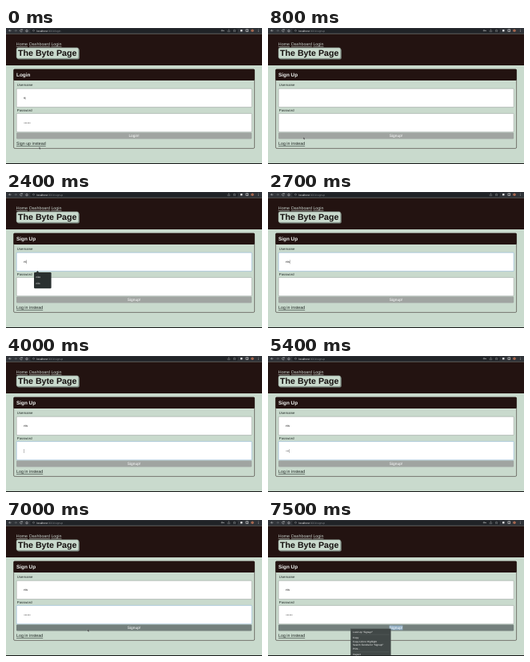
Animation of 320 by 171 pixels, one loop 8 s. Source, as an HTML page:

```html
<!DOCTYPE html>
<html lang="en">
<head>
<meta charset="utf-8">
<title>Sign up demo</title>
<style>
  html, body { margin: 0; width: 100%; height: 100%; overflow: hidden; background: #c9dacd; }
  svg { display: block; width: 100vw; height: 100vh; }
  text { font-family: "Liberation Sans", Arial, sans-serif; text-rendering: geometricPrecision; white-space: pre; }
  .link { font-size: 5.33px; text-decoration: underline; }
  .label { font-size: 4.27px; fill: #222b27; }
  .bold { font-weight: bold; }
  .menu { font-size: 3.1px; fill: #fff; }
</style>
</head>
<body>
<svg id="stage" viewBox="0 0 320 171" preserveAspectRatio="none"></svg>
<script>
const LOOP = 8000, TICK = 100;
const INK = '#231311', PAGE = '#c9dacd', GREY = '#8f9692', BLUE = '#7eaad6';
const stage = document.getElementById('stage');

function add(tag, attrs, parent = stage, content) {
  const el = document.createElementNS('http://www.w3.org/2000/svg', tag);
  for (const k in attrs) el.setAttribute(k, attrs[k]);
  if (content !== undefined) el.textContent = content;
  parent.appendChild(el);
  return el;
}
const rect = (x, y, width, height, fill, more = {}, parent) =>
  add('rect', { x, y, width, height, fill, ...more }, parent);
const text = (x, y, content, more = {}, parent) => add('text', { x, y, ...more }, parent, content);
const line = (d, stroke, width = 0.6, parent) =>
  add('path', { d, stroke, 'stroke-width': width, fill: 'none' }, parent);
const group = () => add('g', {});
const show = (el, on) => el.setAttribute('visibility', on ? 'visible' : 'hidden');
const write = (el, s) => { if (el.textContent !== s) el.textContent = s; };

// Browser bar
rect(0, 0, 320, 171, PAGE);
rect(0, 0, 320, 7.5, '#303338');
rect(30, 0.8, 260, 5.2, '#202327', { rx: 2.6 });
line('M6.5 3.3H3.7M5 1.9L3.7 3.3L5 4.7', '#d5d7d8', 0.5);
line('M10.5 3.3H13.3M12 1.9L13.3 3.3L12 4.7', '#777b7f', 0.5);
const reload = line('M20.2 2.4A1.5 1.5 0 1 0 20.4 4M20.4 1.4V2.7H19.1', '#d5d7d8', 0.5);
const stop = line('M17.7 2L20.3 4.6M20.3 2L17.7 4.6', '#d5d7d8', 0.5);
line('M24.6 3.3L26 1.9L27.4 3.3M25 3V4.7H27V3', '#d5d7d8', 0.5);
add('circle', { cx: 34.5, cy: 3.3, r: 1, fill: 'none', stroke: '#a5a9ac', 'stroke-width': 0.45 });
const url = add('text', { x: 38.4, y: 4.5, 'font-size': 3.4 });
add('tspan', { fill: '#f2f3f4' }, url, 'localhost');
const path = add('tspan', { fill: '#85898d' }, url);
const key = group();
add('circle', { cx: 270, cy: 3.3, r: 0.8, fill: 'none', stroke: '#c8cbcd', 'stroke-width': 0.5 }, key);
line('M270.9 3.3H272.8M272.4 3.3V4.2', '#c8cbcd', 0.5, key);
line('M277.2 3V4.7H279.8V3M278.5 3.8V1.7M277.8 2.4L278.5 1.7L279.2 2.4', '#a3a7aa', 0.4);
line('M285.6 1.8L286.1 2.8L287.2 2.9L286.3 3.7L286.6 4.8L285.6 4.2L284.6 4.8L284.9 3.7L284 2.9L285.1 2.8Z', '#a3a7aa', 0.4);
rect(293, 2.1, 2.5, 2.5, '#d8dadc', { rx: 0.5 });
rect(300, 1.9, 2.7, 2.7, 'none', { stroke: '#e4e6e7', 'stroke-width': 0.6 });
add('circle', { cx: 308, cy: 3.3, r: 1.8, fill: '#a5674f' });
for (const y of [1.9, 3.3, 4.7]) add('circle', { cx: 315.5, cy: y, r: 0.35, fill: '#d5d7d8' });

// Site header
rect(0, 7.5, 320, 39.5, INK);
[[12.8, 'Home'], [29, 'Dashboard'], [56.4, 'Login']].forEach(([x, s]) =>
  text(x, 22.4, s, { class: 'link', fill: '#c9d3cd' }));
rect(14, 26, 77.8, 13.6, '#7d8981', { rx: 2 });
rect(13, 24.8, 77.8, 13.6, PAGE, { rx: 2, stroke: '#69746d', 'stroke-width': 0.5 });
text(15, 34.9, 'The Byte Page', { class: 'bold', 'font-size': 10.67, fill: '#15100f' });

// Form card
rect(9.6, 52, 301, 99.4, PAGE, { rx: 1.4, stroke: INK, 'stroke-width': 0.5 });
rect(9.4, 51.7, 301.4, 14.3, INK, { rx: 1.2 });
const heading = text(13, 61.2, '', { class: 'bold', 'font-size': 6.4, fill: '#f1f4f2' });
text(13.8, 73.3, 'Username', { class: 'label' });
text(13.8, 104.6, 'Password', { class: 'label' });
const fields = [76.2, 107.4].map(y =>
  rect(13.2, y, 294, 23.4, '#fff', { rx: 0.8, 'stroke-width': 0.5 }));
const user = text(22.2, 89.2, '', { 'font-size': 4, fill: '#111' });
const dots = Array.from({ length: 6 }, (_, i) =>
  add('circle', { cx: 23 + i * 1.4, cy: 119.2, r: 0.48, fill: '#222' }));
const caret = rect(0, 0, 0.35, 5, '#444');
const button = rect(13, 131.4, 294.2, 8, '', { rx: 1.2 });
const mark = rect(151.6, 132.5, 16.8, 5.8, '#8facc2');
const action = text(160, 137.1, '', { 'font-size': 4.8, 'text-anchor': 'middle', fill: '#fff' });
const swap = text(13, 147, '', { class: 'link', fill: '#1d2421' });
rect(0, 170, 320, 1, '#151716');

// Saved-name list
const list = group();
add('path', { d: 'M37.4 101.4L39.4 99L41.4 101.4Z', fill: '#2a3030' }, list);
const listBox = rect(35, 101, 21.6, 36, '#2a3030', { rx: 1.2 }, list);
const names = Array.from({ length: 4 }, (_, i) =>
  text(37.6, 107.6 + i * 7.9, '', { class: 'menu' }, list));

// Context menu
const menu = group();
rect(103.3, 136.8, 50.2, 33.2, '#3f4645', { stroke: '#59615f', 'stroke-width': 0.3 }, menu);
[[141.5, 'Look Up “Signup!”'], [148.8, 'Copy'], [153.5, 'Copy Link to Highlight'],
 [158.3, 'Search Fendra for “Signup!”'], [162.9, 'Print...'], [170.4, 'Inspect']]
  .forEach(([y, s]) => text(106, y, s, { class: 'menu' }, menu));
for (const y of [144, 165.8]) line(`M106 ${y}H151.5`, '#646c6a', 0.35, menu);

// Pointers
const arrow = group();
add('path', { d: 'M0 0V2.7L0.7 2.1L1.2 3.2L1.7 2.9L1.2 2H2Z', fill: '#111', stroke: '#ddd', 'stroke-width': 0.25 }, arrow);
const beam = group();
line('M-0.8 -2.2Q0 -2.2 0 -1.6V1.6Q0 2.2 -0.8 2.2M0.8 -2.2Q0 -2.2 0 -1.6M0 1.6Q0 2.2 0.8 2.2', '#333', 0.45, beam);

const moves = [[0, 41.5, 149.6], [300, 40, 147], [700, 40, 147], [1000, 53, 118],
  [1300, 70, 88], [1400, 70, 88], [1500, 71, 88], [6500, 71, 88], [6800, 90, 121],
  [7000, 102, 137.6], [7100, 103, 137], [8000, 103, 137]];
const typed = [[1800, 'n'], [2200, 'ni'], [2700, 'niv']];
const presses = [4700, 4900, 5400, 5600, 5900, 6300];
const saved = ['novaberry', 'niko', 'nilo', 'q'];

function pointAt(t) {
  const i = Math.max(1, moves.findIndex(m => m[0] >= t));
  const [a, ax, ay] = moves[i - 1], [b, bx, by] = moves[i];
  const k = (t - a) / (b - a);
  return [ax + (bx - ax) * k, ay + (by - ay) * k];
}

function render(t) {
  const login = t < 400;
  const within = (a, b) => t >= a && t < b;

  write(path, login ? ':3001/login' : ':3001/signup');
  write(heading, login ? 'Login' : 'Sign Up');
  write(action, login ? 'Login!' : 'Signup!');
  write(swap, login ? 'Sign up instead' : 'Log in instead');
  const loading = within(300, 500);
  show(reload, !loading);
  show(stop, loading);
  show(key, !within(1800, 4700));

  const name = typed.filter(s => t >= s[0]).map(s => s[1]).pop() || '';
  write(user, login ? 'q' : name);
  const count = login ? 6 : presses.filter(p => t >= p).length;
  dots.forEach((d, i) => show(d, i < count));

  const focus = within(1300, 3000) ? 0 : within(3000, 7300) ? 1 : -1;
  fields.forEach((f, i) => f.setAttribute('stroke', i === focus ? BLUE : GREY));
  const blinkOff = within(3500, 4000) || within(4500, 4700) || within(6800, 7300);
  show(caret, focus >= 0 && !blinkOff);
  const nameWidth = name ? user.getComputedTextLength() : 0;
  caret.setAttribute('x', 22.2 + (focus === 1 ? count * 1.4 + 0.2 : nameWidth + 0.2));
  caret.setAttribute('y', focus === 1 ? 117 : 85.4);

  const matches = saved.filter(s => s.startsWith(name));
  show(list, within(1400, 2700));
  listBox.setAttribute('height', 4.4 + matches.length * 7.9);
  names.forEach((n, i) => write(n, matches[i] || ''));

  const [x, y] = pointAt(t);
  show(beam, within(1100, 1800) || within(6600, 6900));
  show(arrow, t < 1100 || within(6900, 7400));
  for (const p of [arrow, beam]) p.setAttribute('transform', `translate(${x} ${y})`);

  button.setAttribute('fill', t >= 6900 ? '#74807d' : '#a0a4a1');
  show(mark, t >= 7300);
  show(menu, t >= 7400);
  menu.setAttribute('opacity', t < 7500 ? 0.7 : 0.98);
}

const start = performance.now();
function frame() {
  const t = (performance.now() - start) % LOOP;
  render(Math.floor(t / TICK) * TICK);
  requestAnimationFrame(frame);
}
frame();
</script>
</body>
</html>
```
